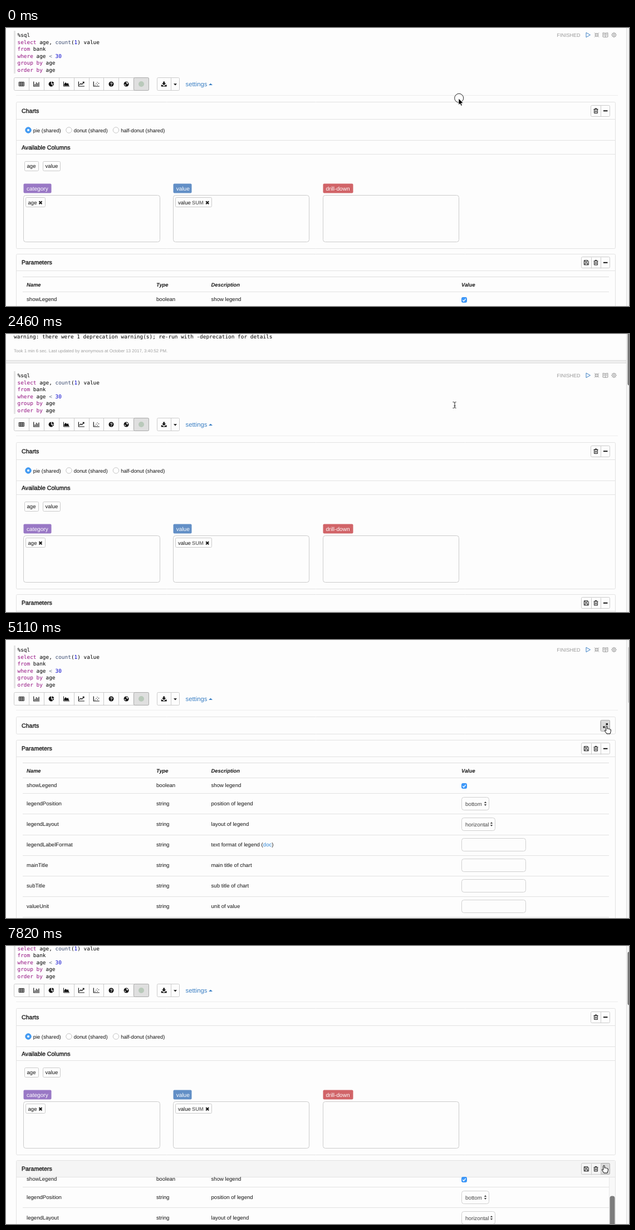
These frames come from a looping animation (1119 by 501 pixels, 8 s). An HTML page with a canvas:

```html
<!DOCTYPE html>
<html lang="en">
<head>
<meta charset="utf-8">
<title>Notebook chart settings</title>
<style>
html, body { margin: 0; width: 1119px; height: 501px; overflow: hidden; background: #fdfdfd; }
canvas { display: block; }
</style>
</head>
<body>
<canvas id="stage" width="1119" height="501"></canvas>
<script>
const ctx = document.getElementById('stage').getContext('2d');
const LOOP = 8000, PAGE = '#fdfdfd', INK = '#141414', RULE = '#e2e2e2', EDGE = '#cbcbcb', LINK = '#3a7fc4';

const bursts = [[0, 140, 2], [440, 1350, 7], [1650, 1860, 2], [2130, 2460, 2], [2730, 2990, 2],
  [3260, 4210, 6], [4510, 4690, 2], [5110, 5290, 2], [5650, 6680, 7], [6980, 7820, 5]];
const steps = bursts.flatMap(([a, b, n]) => Array.from({ length: n }, (_, i) => a + (b - a) * i / (n - 1)));

// Keys are [time, value, value...], linear in between.
const scrollKeys = [[0, 0], [1350, 0], [1650, 50], [2130, 87], [2460, 62], [2730, 12], [2990, -2], [3260, 5], [7190, 5], [7610, -21]];
const tableKeys = [[0, 0], [6680, 0], [7190, 48]];
const pointerKeys = [[0, 813, 127], [140, 803, 207], [440, 812, 225], [740, 832, 230], [1350, 805, 127], [2990, 805, 127],
  [4210, 1079, 155], [5820, 1079, 155], [6680, 1090, 423], [7190, 1088, 420], [7820, 1074, 395]];

function sample(keys, t) {
  const i = keys.findIndex(k => k[0] > t);
  if (i < 0) return keys[keys.length - 1].slice(1);
  const a = keys[i - 1], b = keys[i], f = (t - a[0]) / (b[0] - a[0]);
  return a.slice(1).map((v, j) => v + (b[j + 1] - v) * f);
}

function text(str, x, y, size = 9.6, color = INK, style = '', family = '"Liberation Sans", Arial, sans-serif') {
  ctx.font = `${style} ${size}px ${family}`;
  ctx.fillStyle = color;
  ctx.fillText(str, x, y + size * 0.36);
}
function title(str, y) {
  text(str, 28, y, 10.6);
  ctx.strokeStyle = INK;
  ctx.lineWidth = 0.35;
  ctx.strokeText(str, 28, y + 3.8);
}
const mono = (str, x, y, color = '#000') => text(str, x, y, 9.42, color, '', '"DejaVu Sans Mono", monospace');

function fillRect(x, y, w, h, color) {
  ctx.fillStyle = color;
  ctx.fillRect(x, y, w, h);
}
const rule = (x1, x2, y, color = RULE) => fillRect(x1, Math.round(y), x2 - x1, 1, color);

function box(x, y, w, h, { r = 2, fill, stroke = EDGE } = {}) {
  const left = Math.round(x), right = Math.round(x + w);
  ctx.beginPath();
  ctx.roundRect(left + 0.5, Math.floor(y) + 0.5, right - left, h, r);
  if (fill) { ctx.fillStyle = fill; ctx.fill(); }
  if (stroke) { ctx.strokeStyle = stroke; ctx.lineWidth = 1; ctx.stroke(); }
}
function disc(x, y, r, fill, stroke) {
  ctx.beginPath();
  ctx.arc(x, y, r, 0, 7);
  if (fill) { ctx.fillStyle = fill; ctx.fill(); }
  if (stroke) { ctx.strokeStyle = stroke; ctx.lineWidth = 1; ctx.stroke(); }
}
function shape(x, y, { fill, line, color = INK, ink = color, width = 1 }) {
  ctx.save();
  ctx.translate(x, y);
  if (fill) { ctx.fillStyle = color; ctx.fill(new Path2D(fill)); }
  if (line) { ctx.strokeStyle = ink; ctx.lineWidth = width; ctx.stroke(new Path2D(line)); }
  ctx.restore();
}

const AXES = 'M-5-4.5V4H5.5';
const icons = {
  table: { line: 'M-4.5-3.5h9v7h-9zM-4.5-1.2h9M-4.5 1.2h9M-1.5-3.5v7M1.5-3.5v7' },
  bars: { line: AXES + 'M-2.5 3V0M-.2 3V-3M2 3V-1.5M4.3 3V-3.5', width: 1.2 },
  pie: { fill: 'M-.5 0V-4.5A4.5 4.5 0 1 0 2.7 3.2zM.7-.7V-4.6A4 4 0 0 1 4.6-.7zM1 .3H4.6A4 4 0 0 1 3.4 2.8z' },
  area: { fill: 'M-4 3V0L-1.5-3 1-.8 3-2 4.8 3z', line: AXES },
  line: { line: AXES + 'M-3.5 1.5L-1-1 .8.6 4.5-3.5M2.3-3.6h2.3v2.3', width: 1.2 },
  scatter: { line: AXES + 'M-3 2h1.3M-1-.5h1.3M1.3 1.5h1.3M1-3h1.3M3.6-1.2h1.3', width: 1.2 },
  globe: { fill: 'M-4.5 0a4.5 4.5 0 1 0 9 0a4.5 4.5 0 1 0-9 0', line: 'M-.5-2.8L2.5-1.8 1 0M-2.8.8L-1.2 2.4', ink: '#fff', width: 1.4 },
  download: { fill: 'M-1.4-4.5h2.8v3h2.4L0 2.2-3.8-1.5h2.4zM-5 1.5h2L0 4l3-2.5h2v3H-5z' },
  down: { fill: 'M-3-1.3h6L0 1.9z' },
  up: { fill: 'M-3.5 1.6h7L0-1.8z', color: LINK },
  trash: { line: 'M-4-2.8h8M-1.5-3v-1.3h3V-3M-3-2.5V4.2h6V-2.5M-1-1v3.7M1-1v3.7' },
  minus: { fill: 'M-3.8-1h7.6v2h-7.6z' },
  save: { line: 'M-4-4h6.5L4-2.5V4h-8zM-2.3-4v2.7h4V-4M-2.3 4V1h4.6v3' },
  expand: { line: 'M.8-.8L3.3-3.3M.8-3.6h2.8v2.8M-.8.8L-3.3 3.3M-3.6.8v2.8h2.8', width: 1.2 },
  play: { line: 'M-3.5-4.2L4 0-3.5 4.2z', color: LINK },
  shrink: { line: 'M-4-4L-1-1M-1-3.6V-1h-2.6M4-4L1-1M1-3.6V-1h2.6M-4 4L-1 1M-1 3.6V1h-2.6M4 4L1 1M1 3.6V1h2.6', color: '#999' },
  book: { line: 'M0-3.2v7M0-3.2L-4.5-3.8v7.3L0 4l4.5-.5v-7.3zM-3.3-1.5h2M-3.3.5h2M1.3-1.5h2M1.3.5h2', color: '#999' },
  gear: { line: 'M-3.4 0a3.4 3.4 0 1 0 6.8 0a3.4 3.4 0 1 0-6.8 0M-1.4 0a1.4 1.4 0 1 0 2.8 0a1.4 1.4 0 1 0-2.8 0M0-3.4v-1.4M0 3.4v1.4M-3.4 0h-1.4M3.4 0h1.4M-2.5-2.5l-.9-.9M2.5 2.5l.9.9M-2.5 2.5l-.9.9M2.5-2.5l.9-.9', color: '#999' },
  cross: { line: 'M-2.5-2.5l5 5M2.5-2.5l-5 5', width: 2 },
  picker: { fill: 'M-2.2-1L0-4 2.2-1zM-2.2 1L0 4 2.2 1z', color: '#444' },
  tick: { line: 'M-2.7 0L-.8 2.2 2.7-2.5', color: '#fff', width: 1.4 }
};
const icon = (name, x, y) => shape(x, y, icons[name]);

const pointers = {
  arrow: { fill: 'M0 0V11.5L2.6 9.2 4.4 13.3 6.3 12.5 4.6 8.5 8 8.2z', line: 'M0 0V11.5L2.6 9.2 4.4 13.3 6.3 12.5 4.6 8.5 8 8.2z', color: '#000', ink: '#fff', width: 0.7 },
  beam: { line: 'M-2.5-4.5Q0-4.5 1-3.5Q2-4.5 3.5-4.5M1-3.5V5.5M-2.5 6.5Q0 6.5 1 5.5Q2 6.5 3.5 6.5M-.5 2.5h3', color: '#222' },
  hand: { color: '#fff', ink: '#000' }
};
pointers.hand.fill = pointers.hand.line =
  'M-1.2 7.5V1.2Q0-.4 1.2 1.2V5.2Q2.4 4 3.4 5.4Q4.7 4.5 5.5 6Q7 5.4 7.4 7V9.5L6 14H0L-3.6 8.6Q-3.6 6.4-1.2 8.6z';

const keyword = '#930f80';
const code = [
  [['%sql']],
  [['select', keyword], [' age, '], ['count', '#3c4c72'], ['('], ['1', '#0000cd'], [') value']],
  [['from', keyword], [' bank']],
  [['where', keyword], [' age '], ['<', '#687687'], [' 30', '#0000cd']],
  [['group by', keyword], [' age']],
  [['order by', keyword], [' age']]
];

function drawOutput() {
  ['defined class Bank', 'bank: org.apache.spark.sql.DataFrame = [age: int, job: string ... 3 more fields]',
    'warning: there were 1 deprecation warning(s); re-run with -deprecation for details']
    .forEach((s, i) => mono(s, 14, -83.5 + i * 13));
  text('Took 1 min 6 sec. Last updated by anonymous at October 13 2017, 3:40:52 PM.', 14, -32, 7.8, '#a0a0a0');
  fillRect(0, -14, 1115, 4, '#eeeeee');
  rule(0, 1115, -15, '#ddd');
  rule(0, 1115, -10, '#ddd');
}

function drawCode() {
  fillRect(14, 5, 3, 77, '#e4e4e4');
  code.forEach((parts, i) => {
    let col = 0;
    for (const [s, color] of parts) {
      mono(s, 20.5 + col * 5.67, 12.5 + i * 12.65, color);
      col += s.length;
    }
  });
  text('FINISHED', 989.5, 13, 9, '#999');
  ['play', 'shrink', 'book', 'gear'].forEach((name, i) => icon(name, 1045.5 + i * 15.5, 12.5));
}

function drawToolbar() {
  box(14, 89, 242, 23);
  box(229, 89, 27, 23, { fill: '#dfdfdf', stroke: '#aaa' });
  ['table', 'bars', 'pie', 'area', 'line', 'scatter', '', 'globe'].forEach((name, i) => {
    const x = 14 + i * 26.9;
    if (i) fillRect(Math.round(x), 90, 1, 23, EDGE);
    if (name) icon(name, x + 13.8, 101);
  });
  disc(189, 101, 4.5, INK);
  text('?', 186.7, 101.1, 8, '#fff', 'bold');
  disc(243, 101, 5, '#b9c9ba');
  box(271, 89, 40, 23);
  fillRect(296, 90, 1, 23, EDGE);
  icon('download', 283.7, 101);
  icon('down', 304, 101.5);
  text('settings', 322.5, 101.2, 11.3, LINK);
  icon('up', 367.5, 101.5);
  rule(18, 1099, 121, '#ededed');
}

function headerButtons(names, y, hover) {
  const left = Math.floor(1085 - names.length * 17.2);
  box(left, y - 10, 1084 - left, 20);
  if (hover) box(1068, y - 10, 16, 20, { fill: '#dadada', stroke: '#aaa' });
  names.forEach((name, i) => {
    const x = 1076.7 - (names.length - 1 - i) * 17.2;
    if (i) fillRect(Math.round(x - 8.7), y - 9, 1, 20, EDGE);
    icon(name, x, y + 0.3);
  });
}

function chip(label, x, y, w) {
  box(x, y - 9, w, 17);
  text(label, x + 4.5, y);
}

function drawCharts(collapsed, hover) {
  box(18, 133, 1076, collapsed ? 31 : 264, { stroke: RULE });
  title('Charts', 149);
  headerButtons(collapsed ? ['expand'] : ['trash', 'minus'], 149, hover);
  if (collapsed) return;
  [164, 202, 227].forEach(y => rule(19, 1094, y));
  [['pie', 40], ['donut', 113], ['half-donut', 197.5]].forEach(([name, x], i) => {
    disc(x, 184, 5.2, i ? '#fff' : '#459df5', i ? '#c4c4c4' : '#3b93ee');
    if (!i) disc(x, 184, 2, '#fff');
    text(name + ' (shared)', x + 8.7, 184.5, 9.4);
  });
  title('Available Columns', 215.5);
  chip('age', 33, 249, 25);
  chip('value', 66, 249, 31);
  [['category', '#9978c5', 49.5], ['value', '#628fc6', 33], ['drill-down', '#d16468', 54.5]].forEach(([name, color, w], i) => {
    const x = 31.3 + i * 268.7;
    box(x, 280, w, 17, { fill: color, stroke: null });
    text(name, x + 5.7, 289, 10.1, '#fff');
    box(x, 301, 244.4, 84, { r: 4 });
  });
  chip('age', 35, 314.5, 35);
  icon('cross', 62, 314.8);
  chip('value', 304.4, 314.5, 65);
  text('SUM', 334, 314.5, 9.4, '#777', 'bold');
  icon('cross', 361.7, 314.8);
}

const rows = [
  ['showLegend', 'boolean', 'show legend'],
  ['legendPosition', 'string', 'position of legend', 'bottom', 49],
  ['legendLayout', 'string', 'layout of legend', 'horizontal', 60],
  ['legendLabelFormat', 'string', 'text format of legend ('],
  ['mainTitle', 'string', 'main title of chart'],
  ['subTitle', 'string', 'sub title of chart'],
  ['valueUnit', 'string', 'unit of value']
];
const columns = [37, 270, 368.5, 818];

function drawTable(top) {
  rule(30, 1083, top + 41, '#ddd');
  ['Name', 'Type', 'Description', 'Value'].forEach((s, i) => text(s, columns[i], top + 55.5, 9.4, INK, 'italic bold'));
  rule(30, 1083, top + 68);
  rows.forEach(([name, type, about, choice, width], i) => {
    const y = top + (i ? 77 + i * 37.1 : 81.5);
    [name, type, about].forEach((s, c) => text(s, columns[c], y));
    if (!i) {
      box(818, y - 3, 9, 9, { fill: '#3b99fc', stroke: '#3b90ee' });
      icon('tick', 823, y + 1.8);
    } else {
      box(818, y - 11, width || 115, 23, { r: 4, stroke: '#d0d0d0' });
    }
    if (choice) {
      text(choice, 825, y + 1, 9.8, '#444');
      icon('picker', 818 + width - 6, y + 0.8);
    }
    if (i === 3) {
      const x = columns[2] + ctx.measureText(about).width;
      text('doc', x, y, 9.6, '#2f86d6');
      text(')', x + ctx.measureText('doc').width, y);
    }
    rule(30, 1083, i ? y + 19.3 : top + 95.5);
  });
}

function drawParameters(top, inner, hover) {
  box(18, top, 1076, 500, { stroke: RULE });
  if (inner) fillRect(19, top + 1, 1075, 30, '#f5f5f5');
  title('Parameters', top + 15);
  headerButtons(['save', 'trash', 'minus'], top + 15.5, hover);
  rule(19, 1094, top + 30);
  ctx.save();
  ctx.beginPath();
  ctx.rect(19, top + 30, 1075, 600);
  ctx.clip();
  drawTable(top - inner);
  if (inner) {
    fillRect(1083, top + 31, 11, 500, '#f8f8f8');
    fillRect(1083, top + 31, 1, 500, '#e8e8e8');
    box(1084, top + 16 + inner, 9, 90, { r: 4, fill: '#7d7d7d', stroke: null });
  }
  ctx.restore();
}

function draw(now) {
  const t = Math.max(...steps.filter(s => s <= now));
  const between = (a, b) => t >= a && t < b;
  const scroll = Math.round(sample(scrollKeys, t)[0]);
  const inner = Math.round(sample(tableKeys, t)[0]);
  const [px, py] = sample(pointerKeys, t);
  const collapsed = between(5110, 5800);
  const overCharts = between(4200, 5800), overParameters = t >= 7800;

  fillRect(0, 0, 1119, 501, PAGE);
  ctx.save();
  ctx.translate(0, scroll);
  drawOutput();
  drawCode();
  drawToolbar();
  drawCharts(collapsed, overCharts);
  drawParameters(collapsed ? 175 : 407, inner, overParameters);
  ctx.restore();

  fillRect(1114, 0, 5, 501, '#f4f4f4');
  fillRect(1114, 0, 1, 501, '#dedede');
  if (between(1650, 3600) || t >= 7300) box(1116, 7 - scroll * 0.165, 6, 96, { r: 3, fill: '#777', stroke: null });
  if (between(5110, 5290)) box(1117, 12, 5, 101, { r: 2, fill: '#c4c4c4', stroke: null });

  const kind = between(2130, 3260) ? 'beam' : overCharts || overParameters ? 'hand' : 'arrow';
  if (t < 140 || between(4510, 4690) || between(5650, 5800)) disc(px + 0.7, py - 0.7, 8, null, '#222');
  shape(px, py, pointers[kind]);
}

ctx.textRendering = 'geometricPrecision';
const start = performance.now();
function tick() {
  draw((performance.now() - start) % LOOP);
  requestAnimationFrame(tick);
}
tick();
</script>
</body>
</html>
```
